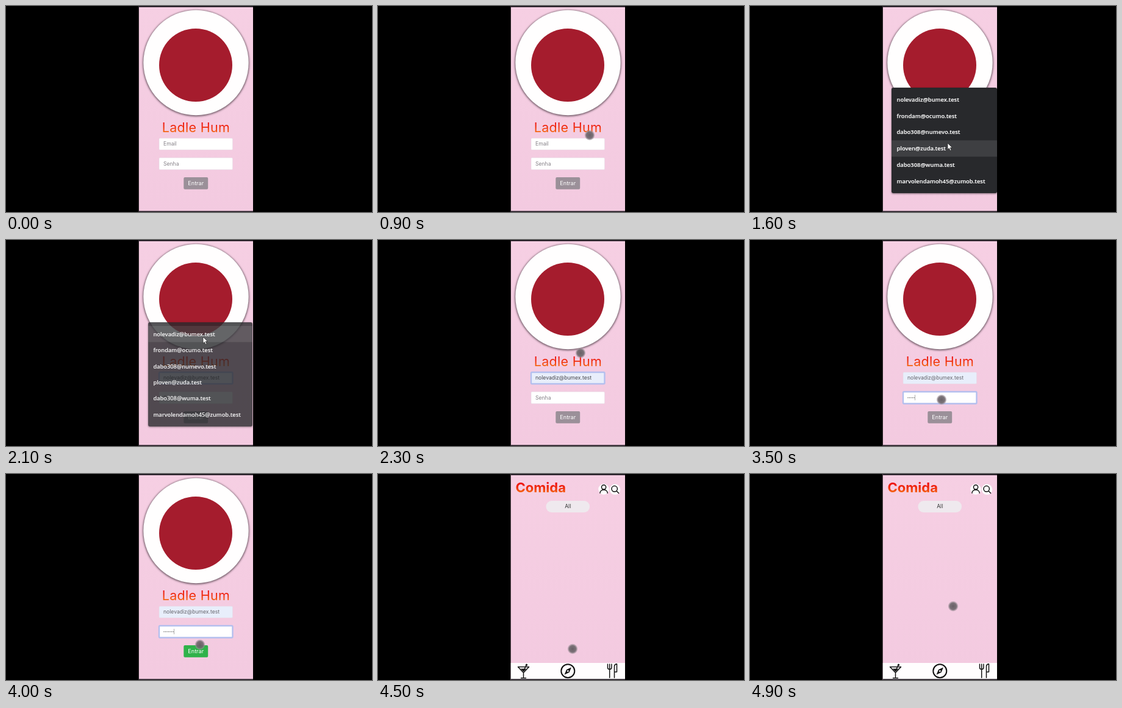
These frames come from a looping animation (600 px wide and 338 px high, 5 s). An HTML page:

```html
<!DOCTYPE html>
<html lang="pt">
<head>
<meta charset="utf-8">
<title>Login</title>
<style>
  html, body { margin: 0; height: 100%; overflow: hidden; background: #000; }
  svg { display: block; width: 100vw; height: 100vh; }
  text { font-family: Inter, sans-serif; }
  .field { font-size: 8.6px; }
  .row { font: 600 9.4px "Open Sans", sans-serif; fill: #fff; stroke: #fff; stroke-width: .15; }
  .ink { fill: none; stroke: #111; stroke-width: 1.5; stroke-linecap: round; stroke-linejoin: round; }
</style>
</head>
<body>
<svg viewBox="0 0 600 338">
  <defs>
    <linearGradient id="pink" x1="0" y1="0" x2="0" y2="1">
      <stop offset="0" stop-color="#f6cfe3"/><stop offset="1" stop-color="#f3cae0"/>
    </linearGradient>
    <linearGradient id="warm" x1=".45" y1="0.15" x2=".4" y2="1">
      <stop offset="0" stop-color="#ee0a12"/><stop offset=".45" stop-color="#f0300c"/><stop offset="1" stop-color="#f98a12"/>
    </linearGradient>
    <radialGradient id="touch">
      <stop offset="0" stop-color="#625a60" stop-opacity=".95"/>
      <stop offset=".68" stop-color="#716a6f" stop-opacity=".92"/>
      <stop offset=".8" stop-color="#8d8289" stop-opacity=".75"/>
      <stop offset="1" stop-color="#a4969f" stop-opacity=".45"/>
    </radialGradient>
    <filter id="soft" x="-10%" y="-10%" width="120%" height="120%"><feGaussianBlur stdDeviation="1.8"/></filter>
    <clipPath id="phone"><rect x="217.8" width="187.2" height="338"/></clipPath>
  </defs>
  <rect width="600" height="338"/>
  <g clip-path="url(#phone)">
    <rect x="217" width="189" height="338" fill="url(#pink)"/>

    <g id="login">
      <circle cx="311.5" cy="93.8" r="87.4" fill="#4d3c46" opacity=".75" filter="url(#soft)"/>
      <circle cx="311.5" cy="93" r="86.2" fill="#fffefe"/>
      <circle cx="311" cy="97" r="60" fill="#a51c2d"/>
      <text x="311.5" y="206.8" font-size="21.5" letter-spacing=".3" text-anchor="middle" fill="url(#warm)">Ladle Hum</text>
      <rect id="mailBox" x="251" y="217" width="120.5" height="19" rx="1.5"/>
      <text id="mail" class="field" x="258" y="229.3"></text>
      <rect id="passBox" x="251" y="249" width="120.5" height="19.5" rx="1.5" fill="#fff"/>
      <text id="hint" class="field" x="258" y="261.8" fill="#858087">Senha</text>
      <g id="dots" fill="#555"></g>
      <path id="caret" stroke="#777" stroke-width=".6"/>
      <rect id="button" x="291.3" y="281" width="39.9" height="19.7" rx="2"/>
      <text x="311.2" y="293.9" font-size="9.1" text-anchor="middle" fill="#fff">Entrar</text>
    </g>

    <g id="home">
      <rect x="217" width="189" height="338" fill="url(#pink)"/>
      <text x="225.5" y="30.3" font-size="22" font-weight="700" fill="url(#warm)">Comida</text>
      <circle cx="370" cy="25" r="8.7" fill="#fff"/>
      <circle cx="388.5" cy="25.3" r="8.7" fill="#fff"/>
      <path class="ink" d="M366.5 21.5a3.6 3.6 0 1 1 7.2 0a3.6 3.8 0 1 1-7.2 0M364 31.3c0-7 12.2-7 12.2 0"/>
      <path class="ink" d="M383 24.3a4.7 4.7 0 1 1 9.4 0a4.7 4.7 0 1 1-9.4 0M391.2 27.9l3.4 3.6"/>
      <rect x="275.5" y="44" width="71.5" height="19" rx="9" fill="#efe9ee"/>
      <text x="311.2" y="56.3" font-size="8.6" text-anchor="middle" fill="#333">All</text>
      <rect x="217" y="310" width="189" height="27" fill="#fffdfe"/>
      <path class="ink" d="M229.5 316.5h18l-9 9.5zM238.5 326v8.5M234.5 334.7h8M239.5 321l4-8"/>
      <path d="M233.5 319.5h10l-5 5z" fill="#111"/>
      <circle cx="243.5" cy="313.2" r="1.6" fill="#111"/>
      <circle class="ink" cx="311.3" cy="323.3" r="11" style="stroke-width:2"/>
      <path d="M317 317.3l-3.4 8.3l-8 3.7l3.4-8.3z" fill="#111"/>
      <circle cx="311.3" cy="323.3" r="1.4" fill="#fff"/>
      <path class="ink" d="M376.5 312v5.5q0 3 3.2 3t3.2-3V312M379.7 312v22.3M387.5 334.3V315q1-3.5 4-3.2v13h-3.8"/>
    </g>

    <g id="popup">
      <rect x="232" y="135" width="173" height="173" rx="3" fill="#000" opacity=".5" filter="url(#soft)"/>
      <rect x="232" y="134" width="173" height="173" rx="3" fill="#28292c"/>
      <rect id="hover" x="232" width="173" height="26.8" fill="#3e3f42"/>
    </g>
    <g id="rows"></g>
    <circle id="dot" r="8.2" fill="url(#touch)"/>
    <path id="arrow" d="M0 0v10.5l2.4-2.2l1.8 4l1.8-.8l-1.8-3.9h3.4z" fill="#fff" stroke="#222" stroke-width=".7"/>
    <rect x="217" width="189" height="2" fill="#29222a"/>
    <rect x="217" y="336.3" width="189" height="2" fill="#29222a"/>
  </g>
</svg>
<script>
const $ = id => document.getElementById(id);
const NS = "http://www.w3.org/2000/svg";
const set = (id, attrs) => { for (const k in attrs) $(id).setAttribute(k, attrs[k]); };
const show = (id, on) => $(id).style.display = on ? "" : "none";
const add = (parent, tag, attrs) => {
  const el = document.createElementNS(NS, tag);
  for (const k in attrs) el.setAttribute(k, attrs[k]);
  return $(parent).appendChild(el);
};

const LOOP = 5000, STEP = 100, ROW = 26.8, TOP = 140;
const mails = ["nolevadiz@bumex.test", "frondam@ocumo.test", "dabo308@numevo.test",
  "ploven@zuda.test", "dabo308@wuma.test", "marvolendamoh45@zumob.test"];
mails.forEach((m, i) => add("rows", "text", { class: "row", x: 240.5, y: 156.8 + ROW * i }).textContent = m);
const bullets = Array.from({ length: 7 }, (_, i) => add("dots", "circle", { cx: 259 + i * 2.5, cy: 258.8, r: .7 }));

// Pointer path: time, x, y
const path = [
  [700, 394, 124], [800, 372, 170], [900, 347, 212], [1000, 334, 222], [1200, 325, 227], [1300, 325, 226],
  [1600, 324, 225], [2100, 323, 159], [2200, 324, 168], [2500, 348, 220], [2700, 361, 243], [2800, 334, 256],
  [2900, 314, 262], [3600, 314, 262], [4000, 318, 280], [4200, 319, 287], [4500, 319, 287],
  [4800, 322, 269], [4900, 333, 217]
];
function pointer(t) {
  const i = path.findIndex(p => p[0] >= t);
  if (i < 1) return path[0].slice(1);
  const [a, b] = [path[i - 1], path[i]];
  const k = (t - a[0]) / (b[0] - a[0]);
  return [a[1] + (b[1] - a[1]) * k, a[2] + (b[2] - a[2]) * k];
}

function ring(id, on) {
  set(id, on ? { stroke: "#b4bfee", "stroke-width": 2.4 } : { stroke: "#e6dbe4", "stroke-width": .6 });
}

function render(t) {
  const [x, y] = pointer(t);
  const open = t >= 1600 && t < 2200;
  const closing = t >= 2100;
  const filled = t >= 2000;
  const typing = t >= 3100;
  const count = Math.max(0, Math.min(7, Math.floor((t - 3100) / 80)));

  show("login", t < 4300);
  show("home", t >= 4200);
  set("home", { opacity: t < 4300 ? .6 : 1 });

  ring("mailBox", t >= 1600 && !typing);
  ring("passBox", typing);
  set("mailBox", { fill: filled ? "#e8eefb" : "#fff" });
  $("mail").textContent = filled ? mails[0] : "Email";
  set("mail", { fill: typing ? "#65646b" : filled ? "#46464c" : "#858087" });
  show("hint", count === 0);
  bullets.forEach((b, i) => b.style.display = i < count ? "" : "none");
  show("caret", typing);
  set("caret", { d: `M${258 + count * 2.5} 254v9` });
  set("button", { fill: t >= 3700 ? "#2fb24a" : "#9b9099" });

  // The popup shrinks slightly as it fades out
  const shrink = closing ? "translate(318.5 220.5) scale(.988) translate(-318.5 -220.5)" : "";
  for (const id of ["popup", "rows"]) {
    show(id, open);
    set(id, { transform: shrink });
  }
  set("popup", { opacity: closing ? .8 : 1 });
  set("rows", { opacity: closing ? .9 : 1 });
  const row = Math.max(0, Math.min(5, Math.floor((y - TOP) / ROW)));
  set("hover", { y: TOP + ROW * row });

  show("arrow", open);
  show("dot", t >= 700 && !open);
  set("arrow", { transform: `translate(${x} ${y})` });
  set("dot", { cx: x, cy: y });
}

const start = performance.now();
function tick() {
  const t = (performance.now() - start) % LOOP;
  render(Math.floor(t / STEP) * STEP);
  requestAnimationFrame(tick);
}
tick();
</script>
</body>
</html>
```
